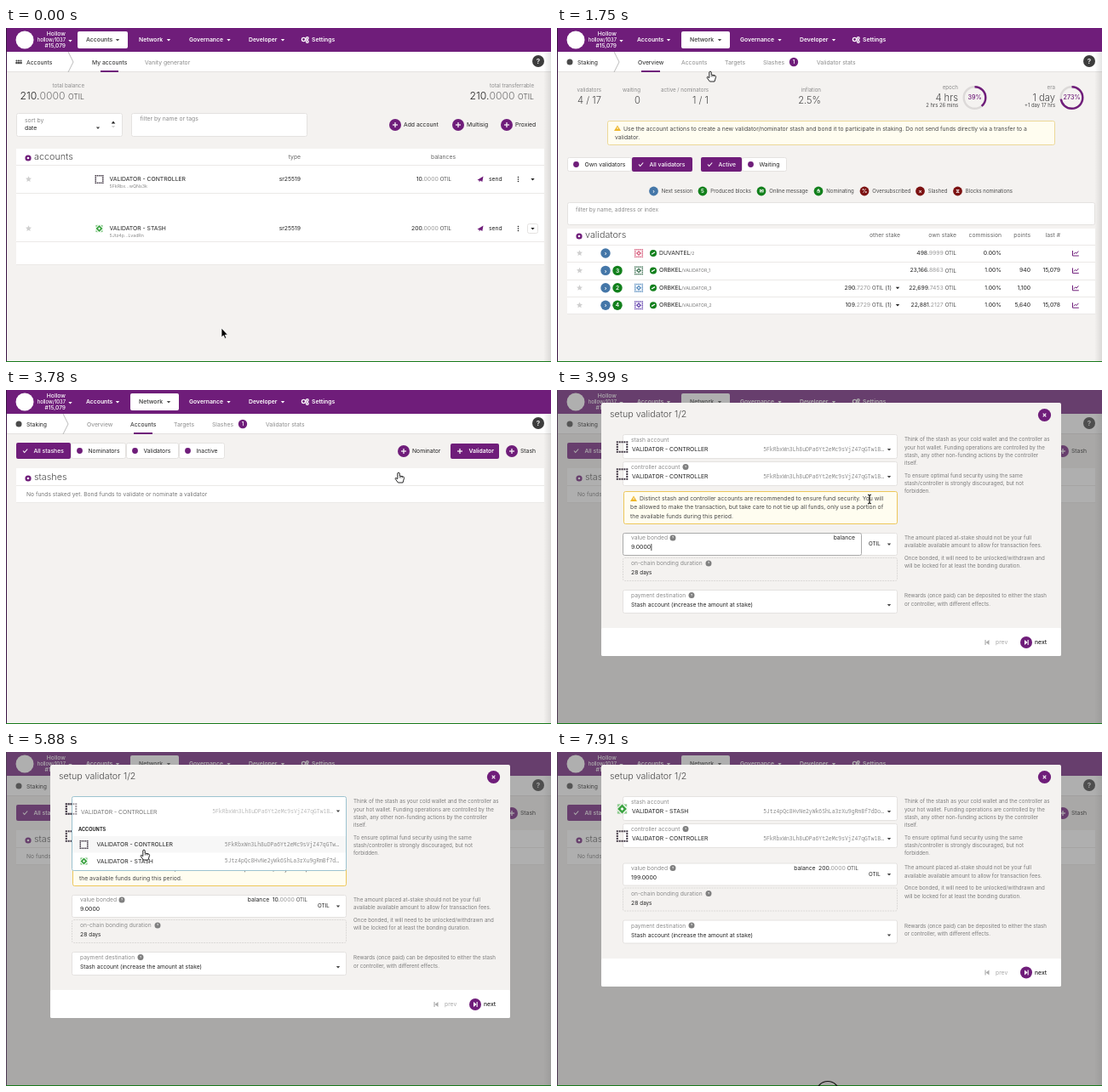
Write an HTML page with a canvas that moves like this. It is 640 px wide and 393 px high and loops after 7.98 s.

```html
<!DOCTYPE html>
<html lang="en">
<head>
<meta charset="utf-8">
<style>
html, body { margin: 0; height: 100%; overflow: hidden; }
canvas { display: block; }
</style>
</head>
<body>
<canvas id="stage" width="640" height="393"></canvas>
<script>
const c = document.getElementById('stage').getContext('2d');
const LOOP = 7980, TAU = Math.PI * 2;
const PURPLE = '#6f1d7a', INK = '#4a4a4a', DARK = '#222', GREY = '#8b8b8b', PALE = '#cfcfcf';
const PAGE = '#f4f2f0', LINE = '#e4e2e0', GREEN = '#12801c', BLUE = '#4577a8', RED = '#7c1212';
const UNIT = 'OTIL';
const CONTROLLER = { name: 'VALIDATOR - CONTROLLER', key: '5FkRbxWn3Lh8uDPa6Yt2eMc9sVjZ47qGTw1B' };
const STASH = { name: 'VALIDATOR - STASH', key: '5Jtz4pQc8HvNe2yWk6ShLa3rXu9gRmBf7dDo' };

// Moments when the interface changes, in ms
const MENU = 1190, OVERVIEW = 1680, STAKES = 2590, HOVER = 3360, MODAL = 3850,
  LOADED = 4130, LIST = 4970, PICKED = 6300, FILLED = 6650, LEAVE = 7560;

const pointer = [[0, 253, 353], [630, 246, 303], [700, 246, 303], [1260, 178, 14], [1470, 185, 60],
  [1610, 180, 51], [1750, 180, 51], [2380, 162, 43], [2590, 162, 42], [3500, 546, 72], [3640, 546, 74],
  [3780, 461, 97], [3990, 367, 128], [4200, 350, 122], [4830, 186, 68], [5040, 186, 68],
  [5880, 162, 115], [6160, 160, 127], [LEAVE, 160, 127], [7840, 316, 394], [LOOP, 318, 420]];

/* drawing helpers */
function text(s, x, y, color = INK, size = 6.8, align = 'left', weight = 400, family = 'Inter, sans-serif') {
  c.font = `${weight} ${size}px ${family}`;
  c.fillStyle = color;
  c.textAlign = align;
  c.textBaseline = 'middle';
  c.fillText(s, x, y);
  return c.measureText(s).width;
}
const mono = (s, x, y, align, color = GREY) => text(s, x, y, color, 6.4, align, 400, '"Noto Sans Mono", monospace');

function rect(x, y, w, h, fill) {
  c.fillStyle = fill;
  c.fillRect(x, y, w, h);
}
function box(x, y, w, h, fill = '#fff', border = LINE, r = 2) {
  const inset = border ? .5 : 0;
  c.beginPath();
  c.roundRect(x + inset, y + inset, w - 2 * inset, h - 2 * inset, r);
  c.fillStyle = fill;
  c.fill();
  if (border) outline(border, 1);
}
function outline(color, width = 1) {
  c.strokeStyle = color;
  c.lineWidth = width;
  c.stroke();
}
function disc(x, y, r, fill) {
  c.beginPath();
  c.arc(x, y, r, 0, TAU);
  c.fillStyle = fill;
  c.fill();
}
function shape(points, fill) {
  c.beginPath();
  points.forEach(([x, y]) => c.lineTo(x, y));
  c.closePath();
  c.fillStyle = fill;
  c.fill();
}
function stroke(points, color, width = 1) {
  c.beginPath();
  points.forEach(([x, y]) => c.lineTo(x, y));
  outline(color, width);
}
const at = (x, y, points) => points.map(([px, py]) => [x + px, y + py]);
const caret = (x, y, color = '#444') => shape(at(x, y, [[-2.2, -1.1], [2.2, -1.1], [0, 1.4]]), color);
const check = (x, y) => stroke(at(x, y, [[-2.5, 0], [-.8, 2], [2.7, -2]]), '#fff', 1.1);

function badge(x, y, r, fill, label) {
  disc(x, y, r, fill);
  text(label, x, y + .2, '#fff', r * 1.15, 'center', 600);
}
function plus(x, y) {
  stroke([[x - 3, y], [x + 3, y]], '#fff', 1.2);
  stroke([[x, y - 3], [x, y + 3]], '#fff', 1.2);
}
function addButton(x, y, label) {
  disc(x, y, 7, PURPLE);
  plus(x, y);
  text(label, x + 10, y, DARK);
}
function star(x, y) {
  shape(Array.from({ length: 10 }, (_, i) => {
    const r = i % 2 ? 1.7 : 3.7, a = i * TAU / 10 - TAU / 4;
    return [x + r * Math.cos(a), y + r * Math.sin(a)];
  }), PALE);
}
function warningBox(x, y, w, h, border) {
  box(x, y, w, h, '#fffdf0', border);
  const left = x + 12, top = y + 9;
  shape(at(left, top, [[0, -3.6], [4, 3], [-4, 3]]), '#eeb72c');
  rect(left - .4, top - 1.4, .9, 2.4, '#fff');
}
function help(x, y) { badge(x, y, 3.5, '#808080', '?'); }

// Right-aligned balance with a dimmed fraction; returns its left edge
function amount(value, right, y, suffix = '', size = 6.8) {
  const [whole, part] = value.split('.'), big = size > 9, weight = big ? 300 : 400;
  if (suffix) right -= text(suffix, right, y, INK, size, 'right') + 2;
  right -= text(UNIT, right, y + size * .06, INK, big ? 8.7 : 6, 'right', weight) + (big ? 3.5 : 2);
  right -= text(part, right, y, big ? '#777' : '#999', size, 'right', weight);
  return right - text(whole + '.', right, y, DARK, size, 'right', weight);
}
function identicon(x, y, s, account, color = '#3d3340') {
  const u = s / 4;
  if (account === STASH) {
    for (const [dx, dy] of [[-1, -1], [1, -1], [1, 1], [-1, 1]]) {
      shape(at(x, y, [[dx * u * .4, dy * u * 2], [dx * u * 2, dy * u * .4], [dx * u * 1.3, dy * u * 1.5]]), '#55b558');
      disc(x + dx * u * 1.4, y + dy * u * 1.4, u * .4, '#8acb8c');
    }
    shape(at(x, y, [[0, -u * 1.7], [u * 1.7, 0], [0, u * 1.7], [-u * 1.7, 0]]), '#3da443');
    shape(at(x, y, [[0, -u * .6], [u * .6, 0], [0, u * .6], [-u * .6, 0]]), '#fff');
    return;
  }
  for (let i = 0; i < 25; i++) {
    const col = i % 5 - 2, row = Math.floor(i / 5) - 2;
    if (Math.max(Math.abs(col), Math.abs(row)) < 2) continue;
    rect(x + col * u * .9 - u * .3, y + row * u * .9 - u * .3, u * .62, u * .62, color);
  }
  if (account !== CONTROLLER) {
    shape(at(x, y, [[0, -u * 1.3], [u * 1.3, 0], [0, u * 1.3], [-u * 1.3, 0]]), color);
    disc(x, y, u * .4, '#fff');
  }
}

/* shared page parts */
function frame(active, menuOpen) {
  rect(0, 0, 640, 393, PAGE);
  rect(0, 0, 640, 28, PURPLE);
  rect(0, 28, 640, 24, '#fff');
  rect(0, 51, 640, 1, LINE);
  disc(22, 14, 10.5, '#fff');
  text('Hollow', 70, 7, '#fff', 6.8, 'right', 500);
  text('hollow/1037', 70, 14, '#fff', 5.8, 'right', 500);
  text('#15,079', 70, 21, '#fff', 6.6, 'right', 500);
  caret(75.5, 15, '#fff');
  if (menuOpen) rect(147, 4, 56, 20, '#5c1466');
  const items = [['Accounts', 94, 131], ['Network', 156, 191], ['Governance', 215, 261.5], ['Developer', 285, 325]];
  for (const [label, x, end] of items) {
    const on = label === active, color = on ? INK : '#fff';
    if (on) box(x - 10, 4, end - x + 22, 20, '#fff', null);
    text(label, x, 14, color, 6.8, 'left', 600);
    caret(end, 14, color);
  }
  for (const [x, y, r] of [[349.5, 13.5, 2.1], [353.8, 12, 1.3], [353.8, 16, 1.3]]) {
    c.beginPath();
    c.arc(x, y, r, 0, TAU);
    outline('#fff', 1.3);
  }
  text('Settings', 359, 14, '#fff', 6.8, 'left', 600);
  badge(625, 39, 7, '#3c3c3c', '?');
}
function crumb(label, x) {
  text(label, 24, 40.5, DARK);
  stroke([[x, 28], [x + 6, 40], [x, 52]], '#aaa', .8);
}
function tab(label, x, on) { text(label, x, 40.5, on ? DARK : GREY); }
function edges() {
  const shade = c.createLinearGradient(631, 0, 640, 0);
  shade.addColorStop(0, 'rgba(0,0,0,0)');
  shade.addColorStop(1, 'rgba(0,0,0,.1)');
  rect(631, 28, 9, 364, shade);
  rect(0, 0, 1, 393, '#3a1444');
  rect(0, 392, 640, 1, '#187a1b');
}
function heading(label, y) {
  disc(26, y + 1, 3.6, PURPLE);
  disc(26, y + 1, 1.3, '#fff');
  text(label, 33, y, INK, 10.8, 'left', 300);
}
function stat(label, value, right, y) {
  text(label, right, y, GREY, 6.2, 'right');
  text(value, right, y + 13, INK, 11.2, 'right', 300);
}
function toggle(label, x, y, w, h, on) {
  box(x, y, w, h, on ? PURPLE : '#fff', on ? null : LINE);
  const mid = y + h / 2;
  if (on) check(x + 10.5, mid); else disc(x + 10.5, mid, 3.4, PURPLE);
  text(label, x + 20.5, mid, on ? '#fff' : DARK, 6.8, 'left', on ? 500 : 400);
}

/* pages */
function accountsPage(menuOpen) {
  frame('Accounts', menuOpen);
  for (const x of [12.5, 15, 17.5]) {
    disc(x, 38.6, 1.1, INK);
    rect(x - 1.2, 40, 2.4, 2.2, INK);
  }
  crumb('Accounts', 73);
  tab('My accounts', 101, true);
  tab('Vanity generator', 163);
  rect(111, 50, 21, 2, PURPLE);
  text('total balance', 92, 68.5, GREY, 6.2, 'right');
  amount('210.0000', 92, 80.5, '', 12.2);
  text('total transferrable', 620, 68.5, GREY, 6.2, 'right');
  amount('210.0000', 620, 80.5, '', 12.2);

  box(12, 100, 125, 28);
  text('sort by', 22, 108.5, GREY);
  text('date', 22, 118, DARK);
  caret(108, 117.5);
  shape([[123.7, 112.5], [128.3, 112.5], [126, 109.5]], DARK);
  caret(126, 116, PALE);
  box(147, 100, 207, 28);
  text('filter by name or tags', 157.5, 107, GREY);
  addButton(457, 114, 'Add account');
  addButton(531, 114, 'Multisig');
  addButton(588, 114, 'Proxied');

  rect(12, 142, 620, 136, '#fff');
  for (const y of [161, 194, 251, 278]) rect(12, y, 620, 1, '#ebe9e7');
  heading('accounts', 152);
  text('type', 346, 152, '#666', 6.8, 'right');
  text('balances', 528, 152, '#666', 6.8, 'right');
  [[CONTROLLER, '5FkRbx…wQNs3k', '10.0000', 178], [STASH, '5Jtz4p…LvadRn', '200.0000', 236]]
    .forEach(([account, short, balance, y]) => {
      star(26.5, y);
      identicon(109.5, y, 9.5, account);
      text(account.name, 121.5, y, DARK);
      text(short, 121.5, y + 8.5, GREY, 5.3);
      text('sr25519', 346, y, DARK, 6.8, 'right');
      amount(balance, 523, y);
      shape(at(557, y, [[-3.5, .8], [3.5, -3.5], [2.3, 3], [0, 1.6], [-1.2, 3.4], [-1.4, 1.4]]), PURPLE);
      text('send', 567, y, DARK);
      for (const d of [-2.5, 0, 2.5]) disc(601.5, y + d, .8, DARK);
      if (account === STASH) box(612, y - 6, 13, 12);
      caret(618.5, y, DARK);
    });

  if (!menuOpen) return;
  rect(147, 24, 93, 72, '#5c1466');
  rect(147, 42, 93, 18, '#7e4187');
  ['Explorer', 'Staking', 'Assets', 'Event calendar'].forEach((label, i) =>
    text(label, [167, 165, 166, 164][i], 33.5 + i * 18, '#fff', 6.8, 'left', 500));
  for (let i = 0; i < 6; i++) rect(155 + i % 3 * 3, 31 + (i > 2) * 3, 2.2, 2.2, '#fff');
  disc(158, 51, 3.4, '#fff');
  rect(154.5, 68, 7, 1.2, '#fff');
  shape([[155.2, 69.5], [160.8, 69.5], [160, 73], [156, 73]], '#fff');
  stroke([[156, 68], [158, 65.5], [160, 68]], '#fff', .8);
  rect(155, 85, 5.5, 5, '#fff');
  rect(155, 83.5, 5.5, 1, '#fff');
}

function stakingTabs(active, hovered) {
  frame('Network');
  disc(15, 40, 3.5, INK);
  crumb('Staking', 67);
  [['Overview', 95], ['Accounts', 146], ['Targets', 197], ['Slashes', 242], ['Validator stats', 305]]
    .forEach(([label, x]) => tab(label, x, label === active));
  badge(278, 40, 5.2, PURPLE, '1');
  if (hovered) rect(150, 50, 22, 2, '#b9a5bd');
  rect(active === 'Overview' ? 99 : 150, 50, 22, 2, PURPLE);
}
function ring(x, share, label) {
  c.beginPath();
  c.arc(x, 82, 12.8, 0, TAU);
  outline('#dcd9d8', 2.4);
  c.beginPath();
  c.arc(x, 82, 12.8, -TAU / 4, TAU * (share - .25));
  outline(PURPLE, 2.4);
  text(label, x, 82, PURPLE, 7.2, 'center', 500);
}
function overviewPage(hovered) {
  stakingTabs('Overview', hovered);
  stat('validators', '4 / 17', 52, 73);
  stat('waiting', '0', 98, 73);
  stat('active / nominators', '1 / 1', 178, 73);
  stat('inflation', '2.5%', 310, 73);
  stat('epoch', '4 hrs', 471, 70);
  text('2 hrs 26 mins', 471, 91.5, INK, 5.9, 'right');
  ring(490.5, .39, '39%');
  stat('era', '1 day', 585, 70);
  text('+1 day 17 hrs', 585, 91.5, INK, 5.9, 'right');
  ring(604.5, .73, '273%');

  warningBox(59, 109, 526, 29, '#ecd898');
  text('Use the account actions to create a new validator/nominator stash and bond it to participate in staking. Do not send funds directly via a transfer to a', 78, 118.5);
  text('validator.', 68, 128.5);
  toggle('Own validators', 12, 152, 76, 17);
  toggle('All validators', 88, 152, 71, 17, true);
  toggle('Active', 169, 152, 48, 17, true);
  toggle('Waiting', 217, 152, 53, 17);

  [['Next session', 113.5, BLUE, '›'], ['Produced blocks', 171, GREEN, '5'], ['Online message', 240, GREEN, '✉'],
    ['Nominating', 307, GREEN, '✋\uFE0E'], ['Oversubscribed', 361, RED, '%'], ['Slashed', 426.5, RED, '×'],
    ['Blocks nominations', 470.5, RED, '⧖']].forEach(([label, x, color, mark]) => {
    badge(x, 192, 5.4, color, mark);
    text(label, x + 9.3, 192, INK, 6);
  });
  box(12, 205, 620, 27);
  text('filter by name, address or index', 22, 214, GREY, 6.5);

  rect(12, 236, 620, 101, '#fff');
  for (const y of [255, 275, 296, 316, 336]) rect(12, y, 620, 1, '#ebe9e7');
  heading('validators', 244);
  [['other stake', 403], ['own stake', 469], ['commission', 522], ['points', 556], ['last #', 591]]
    .forEach(([label, x]) => text(label, x, 244, '#666', 6.8, 'right'));
  [['DUVANTEL', '/2', '#d8607f', '', '', '498.9999', '0.00%', '', ''],
    ['ORBKEL', '/VALIDATOR_1', '#4a7a5e', '3', '', '23,166.8863', '1.00%', '940', '15,079'],
    ['ORBKEL', '/VALIDATOR_3', '#5b8fc0', '2', '290.7270', '22,699.7453', '1.00%', '1,100', ''],
    ['ORBKEL', '/VALIDATOR_2', '#6a4bb0', '4', '109.2729', '22,881.2127', '1.00%', '5,640', '15,078']]
    .forEach(([name, sub, color, blocks, other, own, fee, points, last], i) => {
      const y = 265 + i * 20.4;
      star(26.5, y);
      badge(57, y, 5.7, BLUE, '›');
      if (blocks) badge(71, y, 5.7, GREEN, blocks);
      identicon(96, y, 9.5, null, color);
      disc(113, y, 4, GREEN);
      stroke([[111, y + 1.2], [115, y - 1.2]], '#fff', 1.3);
      const w = text(name, 120, y, DARK);
      text(sub, 120 + w, y + .3, '#777', 5.1);
      if (other) {
        amount(other, 393, y, '(1)');
        caret(400, y, DARK);
      }
      amount(own, 469, y);
      text(fee, 522, y, DARK, 6.8, 'right');
      text(points, 556, y, DARK, 6.8, 'right');
      text(last, 591, y, DARK, 6.8, 'right');
      stroke(at(609, y, [[-3.5, -3], [-3.5, 3], [3.8, 3]]), PURPLE, 1);
      stroke(at(609, y, [[-2, 1], [-.3, -1], [1, .4], [3.4, -2.4]]), PURPLE, 1);
    });
}

function stakesPage(hovered) {
  stakingTabs('Accounts');
  toggle('All stashes', 12, 62, 64, 19, true);
  toggle('Nominators', 76, 62, 65, 19);
  toggle('Validators', 141, 62, 62, 19);
  toggle('Inactive', 203, 62, 54, 19);
  addButton(467, 72, 'Nominator');
  if (hovered) {
    box(522, 63, 57, 18, PURPLE, null);
    plus(533, 72);
    text('Validator', 543.5, 72, '#fff', 6.8, 'left', 600);
  } else addButton(533, 72, 'Validator');
  addButton(594, 72, 'Stash');
  rect(12, 92, 620, 40, '#fff');
  rect(12, 112, 620, 1, '#ebe9e7');
  rect(12, 132, 620, 1, '#ebe9e7');
  heading('stashes', 103);
  text('No funds staked yet. Bond funds to validate or nominate a validator', 24, 123, '#777', 6.7);
}

/* validator dialog */
function accountInput(label, account, y) {
  box(77, y, 323, 29);
  text(label, 87, y + 7, GREY, 6.7);
  text(account.name, 88, y + 18, DARK);
  mono(account.key + '…', 384, y + 18, 'right');
  caret(390, y + 18);
  identicon(76.5, y + 15, 12.8, account);
}
function sideText(lines, y) {
  lines.forEach((line, i) => text(line, 408, y + i * 9.3, '#7c7c7c', 6.2));
}
function accountList() {
  box(77, 52, 323, 88, '#fff', '#9cc3d0');
  c.globalAlpha = .5;
  identicon(76.5, 67, 12.8, CONTROLLER);
  c.globalAlpha = 1;
  text(CONTROLLER.name, 88, 70.5, '#777');
  mono(CONTROLLER.key + '…', 384, 70.5, 'right', '#bbb');
  caret(390, 69.5);
  text('ACCOUNTS', 85, 91, DARK, 5.6, 'left', 700);
  rect(78, 99, 321, 19.5, '#f7f7f7');
  [CONTROLLER, STASH].forEach((account, i) => {
    const y = 109 + i * 19.5;
    identicon(91.5, y, 9.5, account);
    text(account.name, 106.5, y, DARK);
    mono(account.key.slice(0, 34) + '…', 391, y, 'right');
  });
}
function dialog(t) {
  const picked = t >= PICKED, dy = picked ? -37.5 : 0, bottom = Math.round(313 + dy);
  const typing = t < LIST, loaded = picked ? t >= FILLED : t >= LOADED;
  rect(0, 0, 640, 392, 'rgba(96,96,96,.5)');
  box(52, 15, 540, bottom - 15, PAGE, null);
  box(52, bottom - 33, 540, 33, '#fff', null);

  text('setup validator 1/2', 62, 28.5, INK, 10.7, 'left', 300);
  disc(572.5, 29.5, 7.6, PURPLE);
  stroke([[570.7, 27.7], [574.3, 31.3]], '#fff', 1.1);
  stroke([[574.3, 27.7], [570.7, 31.3]], '#fff', 1.1);
  accountInput('stash account', picked ? STASH : CONTROLLER, 52);
  accountInput('controller account', CONTROLLER, 84);
  help(151, 90.5);
  sideText(['Think of the stash as your cold wallet and the controller as', 'your hot wallet. Funding operations are controlled by the',
    'stash, any other non-funding actions by the controller', 'itself.'], 58.5);
  sideText(['To ensure optimal fund security using the same', 'stash/controller is strongly discouraged, but not', 'forbidden.'], 101);

  if (!picked) {
    warningBox(78, 119, 322, 39, '#edc75a');
    text('Distinct stash and controller accounts are recommended to ensure fund security. You will', 97, 128);
    text('be allowed to make the transaction, but take care to not tie up all funds, only use a portion of', 86, 138.2);
    text('the available funds during this period.', 86, 148.5);
  }

  c.save();
  c.translate(0, dy);
  box(77, 168, 323, 27);
  if (typing) box(77, 168, 281, 27, '#fff', '#aaa');
  text('value bonded', 87, 174, GREY, 6.7);
  help(136, 174);
  const w = text(picked ? '199.0000' : '9.0000', 87, 185, DARK);
  if (typing) rect(87.5 + w, 181, .8, 8, DARK);
  const balanceEnd = loaded ? amount(picked ? '200.0000' : '10.0000', 354, 174) - 3.5 : 350;
  text('balance', balanceEnd, 174, DARK, 6.8, 'right');
  text(UNIT, 366, 181.5, DARK, 6.2);
  caret(390, 181.5);

  c.setLineDash([2, 1]);
  box(77, 197, 323, 28, PAGE, '#dbd9d7');
  c.setLineDash([]);
  text('on-chain bonding duration', 87, 204, GREY, 6.7);
  help(178, 204);
  const days = text('28', 87, 215, DARK);
  text('days', 89 + days, 215.3, DARK, 6.2);
  box(77, 235, 323, 28);
  text('payment destination', 87, 242, GREY, 6.7);
  help(158, 241.5);
  text('Stash account (increase the amount at stake)', 87, 253, DARK, 6.7);
  caret(390, 253);
  sideText(['The amount placed at-stake should not be your full', 'available available amount to allow for transaction fees.'], 174);
  sideText(['Once bonded, it will need to be unlocked/withdrawn and', 'will be locked for at least the bonding duration.'], 198);
  sideText(['Rewards (once paid) can be deposited to either the stash', 'or controller, with different effects.'], 242.5);

  rect(502.5, 294, 1.1, 6, '#aaa');
  shape([[507.5, 294], [507.5, 300], [503.7, 297]], '#aaa');
  text('prev', 515, 297, '#aaa');
  disc(551, 297, 7, PURPLE);
  shape([[549, 294], [549, 300], [552.6, 297]], '#fff');
  rect(552.6, 294, 1.1, 6, '#fff');
  text('next', 561, 297, DARK, 6.8, 'left', 500);
  c.restore();
  if (t >= LIST && !picked) accountList();
}

/* pointer */
function drawPointer(t) {
  const i = pointer.findIndex(([time]) => time > t), [t0, x0, y0] = pointer[i - 1], [t1, x1, y1] = pointer[i];
  const k = (t - t0) / (t1 - t0), ease = k * k * (3 - 2 * k);
  c.save();
  c.translate(x0 + (x1 - x0) * ease, y0 + (y1 - y0) * ease);
  c.lineJoin = 'round';
  if (t < MENU || t >= LEAVE) {
    const arrow = [[0, 0], [0, 11], [2.4, 8.8], [4, 12.4], [5.8, 11.6], [4.2, 8.2], [7.4, 8], [0, 0]];
    shape(arrow, '#000');
    stroke(arrow, '#fff', .8);
  } else if (t >= MODAL && t < 4340) {
    stroke([[-2, -5], [0, -4], [2, -5]], '#000', 1);
    stroke([[0, -4], [0, 5]], '#000', 1.1);
    stroke([[-2, 6], [0, 5], [2, 6]], '#000', 1);
  } else {
    const hand = [[-1.2, .8], [0, 0], [1.2, .8], [1.2, 4], [5.8, 5], [6.6, 6.4], [5.6, 10], [5, 12],
      [-.6, 12], [-3.8, 7.6], [-3.4, 6.4], [-1.2, 7.6], [-1.2, .8]];
    shape(hand, '#fff');
    stroke(hand, '#111', .9);
    for (const x of [1.2, 2.8, 4.4]) stroke([[x, 4.5], [x, 6.5]], '#111', .6);
  }
  c.restore();
}

function draw(now) {
  const t = now % LOOP;
  if (t < OVERVIEW) accountsPage(t >= MENU);
  else if (t < STAKES) overviewPage(t >= 2240);
  else stakesPage(t >= HOVER && t < MODAL);
  edges();
  if (t >= MODAL) dialog(t);
  drawPointer(t);
  if (t >= 7840) {
    c.beginPath();
    c.arc(318, 401, 13.5, 0, TAU);
    outline('#111', 1.2);
  }
  requestAnimationFrame(draw);
}
requestAnimationFrame(draw);
</script>
</body>
</html>
```
